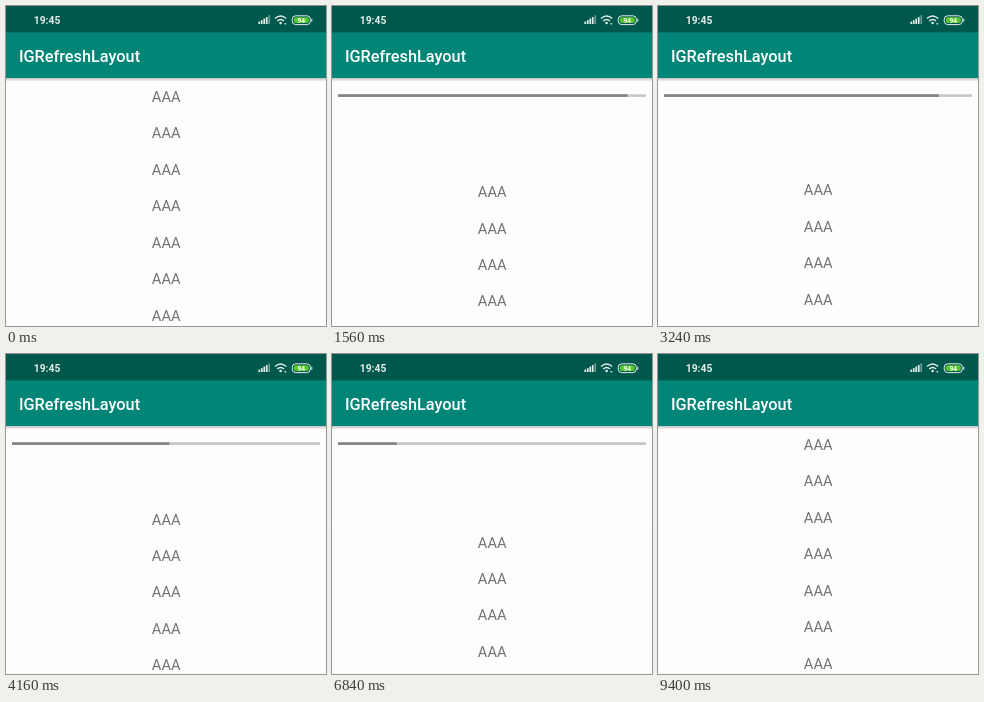
Animation of 320 by 320 pixels, one loop 9920 ms. Source, as an HTML page:

```html
<!DOCTYPE html>
<html lang="en">
<head>
<meta charset="utf-8">
<title>Pull to refresh</title>
<style>
  html, body { margin: 0; width: 100%; height: 100%; overflow: hidden; background: #fdfdfd; }
  svg { display: block; width: 100vw; height: 100vh; font-family: Roboto, "Noto Sans", sans-serif; }
  .row { font-size: 14.7px; fill: #737373; text-anchor: middle; }
  .title { font-size: 16.3px; font-weight: 500; fill: #fff; }
  .clock { font-size: 10.3px; font-weight: 700; fill: #e4eeec; }
  .charge { font-size: 6.6px; font-weight: 700; fill: #fff; text-anchor: middle; }
</style>
</head>
<body>
<svg viewBox="0 0 320 320">
  <defs>
    <linearGradient id="shade" x1="0" y1="0" x2="0" y2="1">
      <stop offset="0" stop-color="#000" stop-opacity=".24"/>
      <stop offset="1" stop-color="#000" stop-opacity="0"/>
    </linearGradient>
  </defs>

  <rect width="320" height="320" fill="#fdfdfd"/>
  <rect x="6" y="88.3" width="308" height="2.6" fill="#c6c6c6"/>
  <rect id="bar" x="6" y="88.3" width="0" height="2.6" fill="#828282"/>

  <g id="list">
    <rect y="72.3" width="320" height="260" fill="#fdfdfd"/>
  </g>

  <rect y="72" width="320" height="3.6" fill="url(#shade)"/>
  <rect y="26" width="320" height="46" fill="#008577"/>
  <rect width="320" height="26.4" fill="#00574b"/>
  <text class="title" x="12.9" y="55.8">IGRefreshLayout</text>
  <text class="clock" x="27.8" y="17.8">19:45</text>

  <g fill="#e4eeec">
    <rect x="252.4" y="15.6" width="1.7" height="2.4"/>
    <rect x="254.9" y="14.2" width="1.7" height="3.8"/>
    <rect x="257.4" y="12.6" width="1.7" height="5.4"/>
    <rect x="259.9" y="11" width="1.7" height="7"/>
    <rect x="262.4" y="9.2" width="1.7" height="8.8" opacity=".45"/>
    <circle cx="274.6" cy="17" r="1.3"/>
    <path d="M278 17.2h2.6l-1.3 1.7z"/>
  </g>
  <g fill="none" stroke="#e4eeec" stroke-width="1.4">
    <path d="M269 12.6q5.6-5 11.2 0"/>
    <path d="M271.2 14.9q3.4-3 6.8 0"/>
  </g>
  <rect x="286.2" y="9.8" width="18.2" height="8.8" rx="3.6" fill="none" stroke="#e4eeec" stroke-width="1"/>
  <rect x="287.7" y="11.3" width="15.2" height="5.8" rx="2.3" fill="#55c92c"/>
  <rect x="305.3" y="12.6" width="1" height="3.2" rx=".5" fill="#e4eeec"/>
  <text class="charge" x="295.3" y="16.6">94</text>
</svg>

<script>
  const LOOP = 9920, HEADER = 97.5, TRACK = 308;
  const REFRESH = 4160, SNAP = 4240, CLOSE = 7120, CLOSE_TIME = 1020;

  // finger drag: [ms, list offset]
  const drag = [
    [0, 0], [1000, 54.5], [1560, 95.1], [1660, 96.1], [2230, 59.4],
    [2480, 75], [3020, 97.5], [4020, 62.8], [4160, 74.5], [4240, 80]
  ];

  const list = document.getElementById('list');
  const bar = document.getElementById('bar');

  for (let i = 0; i < 7; i++) {
    const row = document.createElementNS('http://www.w3.org/2000/svg', 'text');
    row.setAttribute('class', 'row');
    row.setAttribute('x', 160.2);
    row.setAttribute('y', 96 + i * 36.45);
    row.textContent = 'AAA';
    list.append(row);
  }

  const rate = i => (drag[i + 1][1] - drag[i][1]) / (drag[i + 1][0] - drag[i][0]);

  // flat at turning points, harmonic mean elsewhere
  const slope = drag.map((_, i) => {
    if (i === 0) return rate(0);
    if (i === drag.length - 1) return rate(i - 1);
    const a = rate(i - 1), b = rate(i);
    return a * b > 0 ? 2 * a * b / (a + b) : 0;
  });

  function dragged(t) {
    let i = 0;
    while (i < drag.length - 2 && t >= drag[i + 1][0]) i++;
    const [t0, y0] = drag[i], [t1, y1] = drag[i + 1];
    const d = t1 - t0, u = (t - t0) / d, v = 1 - u;
    return v * v * ((1 + 2 * u) * y0 + u * d * slope[i]) +
           u * u * ((3 - 2 * u) * y1 - v * d * slope[i + 1]);
  }

  function offset(t) {
    if (t < SNAP) return dragged(t);
    const u = Math.min(1, Math.max(0, (t - CLOSE) / CLOSE_TIME));
    return HEADER * (1 + Math.cos(Math.PI * u)) / 2;
  }

  // follows the pull, then cycles once per second while refreshing
  function progress(t, y) {
    return t < REFRESH ? Math.min(1, Math.pow(Math.max(0, y) / HEADER, 2.5))
                       : (t - 3650) % 1000 / 1000;
  }

  const start = performance.now();

  function draw(now) {
    const t = Math.max(0, now - start) % LOOP;
    const y = offset(t);
    list.setAttribute('transform', `translate(0 ${y.toFixed(2)})`);
    bar.setAttribute('width', (TRACK * progress(t, y)).toFixed(2));
    requestAnimationFrame(draw);
  }
  draw(start);
</script>
</body>
</html>
```
